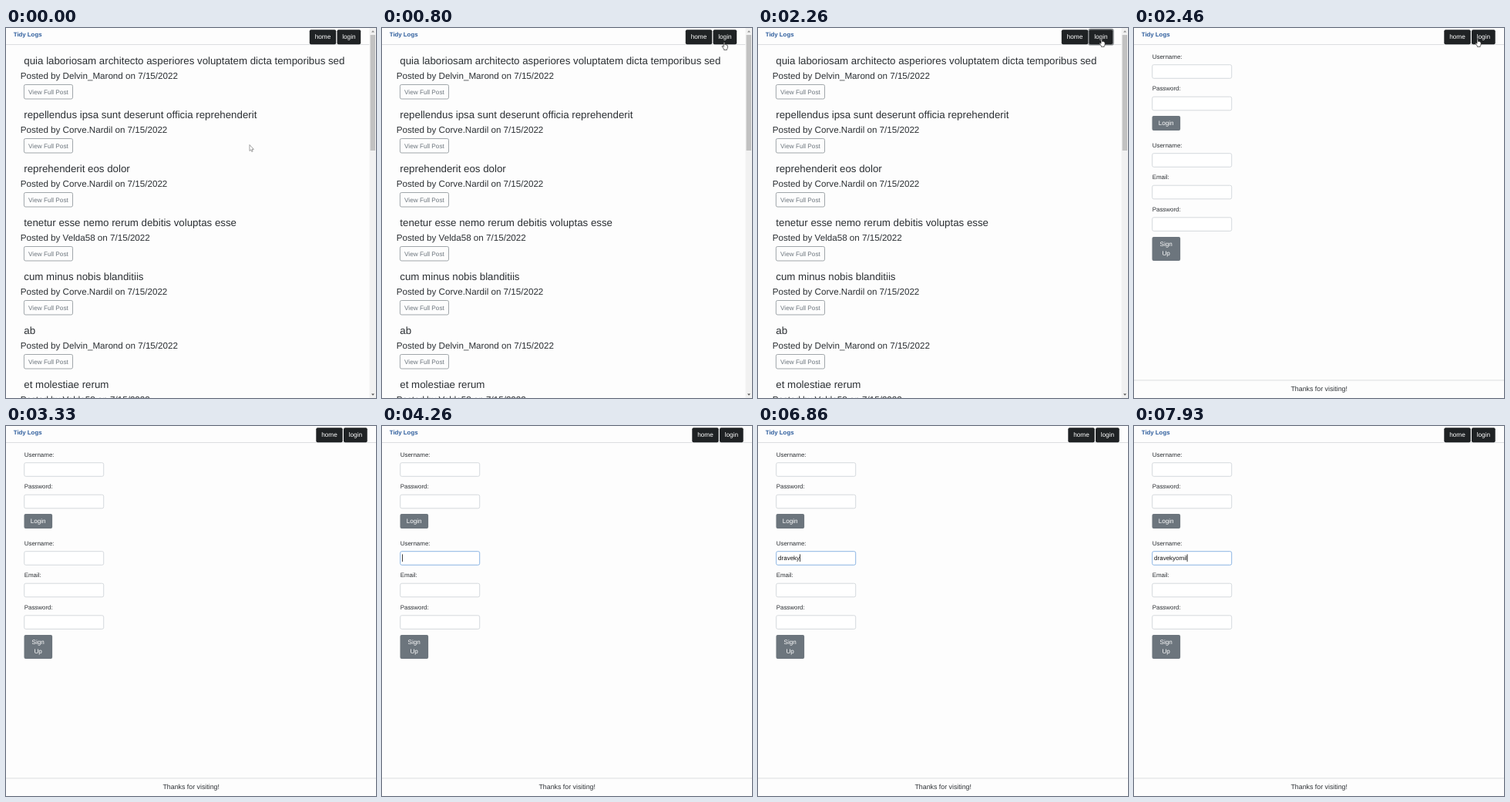
An HTML page that plays this animation: 480 by 480 pixels, repeating every 8000 ms.

```html
<!DOCTYPE html>
<html lang="en">
<head>
<meta charset="utf-8">
<title>Blog sign-up</title>
<style>
html, body { margin: 0; width: 100%; height: 100%; overflow: hidden; background: #fdfdfd; }
svg { display: block; width: 100vw; height: 100vh; }
text { font-family: "Liberation Sans", Arial, sans-serif; fill: #2c3034; text-rendering: geometricPrecision; white-space: pre; }
</style>
</head>
<body>
<svg id="stage" viewBox="0 0 480 480"></svg>
<script>
const LOOP = 8000;
const PAGE_SWITCH = 2400;
const FOCUS_AT = 3800;
const BLINK = 530;
const USER = "dravekyomil";
const KEY_TIMES = [4870, 5060, 5200, 5400, 5660, 5860, 6860, 7400, 7730, 7800, 7930];

const posts = [
  ["quia laboriosam architecto asperiores voluptatem dicta temporibus sed", "Delvin_Marond"],
  ["repellendus ipsa sunt deserunt officia reprehenderit", "Corve.Nardil"],
  ["reprehenderit eos dolor", "Corve.Nardil"],
  ["tenetur esse nemo rerum debitis voluptas esse", "Velda58"],
  ["cum minus nobis blanditiis", "Corve.Nardil"],
  ["ab", "Delvin_Marond"],
  ["et molestiae rerum", "Velda58"]
];

// Pointer stops: time, x, y of the tip
const stops = [
  [60, 316, 151.5], [860, 446, 16], [1400, 443.7, 17],
  [2200, 445.7, 14], [2600, 445.7, 14], [3380, 75, 171]
];

const stage = document.getElementById("stage");

function add(parent, tag, attrs, content) {
  const node = document.createElementNS("http://www.w3.org/2000/svg", tag);
  for (const key in attrs) node.setAttribute(key, attrs[key]);
  if (content !== undefined) node.textContent = content;
  parent.appendChild(node);
  return node;
}

const group = (parent = stage) => add(parent, "g", {});

const label = (parent, x, y, size, content, attrs = {}) =>
  add(parent, "text", { x, y, "font-size": size, ...attrs }, content);

const box = (parent, x, y, width, height, fill, attrs = {}) =>
  add(parent, "rect", { x, y, width, height, fill, ...attrs });

const centered = (parent, x, y, size, content, fill) =>
  label(parent, x, y, size, content, { "text-anchor": "middle", style: `fill:${fill}` });

function header(parent, shift, width) {
  box(parent, 0, 21, width, 1, "#dcdee0");
  label(parent, 9.8, 11.3, 7.8, "Tidy Logs", { "font-weight": 700, style: "fill:#2c5c9c" });
  const ring = box(parent, 429.1 + shift, 1.6, 31.8, 20.2, "none",
    { rx: 2.4, stroke: "#85898c", "stroke-width": 1.6, visibility: "hidden" });
  box(parent, 393.8 + shift, 2.2, 34.4, 19.1, "#1f2224", { rx: 2 });
  box(parent, 429.5 + shift, 2.2, 30.7, 19.1, "#1f2224", { rx: 2 });
  centered(parent, 411 + shift, 14.2, 8.25, "home", "#fff");
  centered(parent, 444.9 + shift, 14.2, 8.25, "login", "#fff");
  return ring;
}

function post(parent, [title, author], i) {
  const y = i * 70;
  label(parent, 23.3, y + 47.1, 13.31, title);
  label(parent, 18.7, y + 66.2, 11.64, `Posted by ${author} on 7/15/2022`);
  box(parent, 23.4, y + 73.5, 63.1, 18.5, "none", { rx: 1.9, stroke: "#8a9196", "stroke-width": 0.8 });
  centered(parent, 54.9, y + 85.6, 8.2, "View Full Post", "#6c757d");
}

function scrollbar(parent) {
  box(parent, 471.5, 0, 8.5, 480, "#f1f1f1");
  box(parent, 472.6, 9, 6.4, 150, "#c1c1c1");
  add(parent, "path", { d: "M474 5.6 L476 3.2 L478 5.6 Z", fill: "#8a8a8a" });
  add(parent, "path", { d: "M474 474.4 L476 476.8 L478 474.4 Z", fill: "#505050" });
}

function field(parent, name, y) {
  label(parent, 23.7, y, 7.95, name);
  return box(parent, 23.7, y + 7.8, 103, 17.6, "#fff",
    { rx: 2, stroke: "#cbd0d5", "stroke-width": 0.8 });
}

function submit(parent, y, height, lines) {
  box(parent, 23.5, y, 36.6, height, "#6c757d", { rx: 2 });
  lines.forEach((line, i) => centered(parent, 41.7, y + 12.2 + i * 12.2, 8.15, line, "#fff"));
}

const list = group();
const loginRing = header(list, 0, 471.5);
posts.forEach((item, i) => post(list, item, i));
scrollbar(list);

const form = group();
header(form, 8.5, 480);
field(form, "Username:", 39.9);
field(form, "Password:", 81.4);
submit(form, 114.1, 18.9, ["Login"]);
const nameField = field(form, "Username:", 154.9);
field(form, "Email:", 196.4);
field(form, "Password:", 238);
submit(form, 271, 31, ["Sign", "Up"]);
const typed = label(form, 26.1, 174, 8, "", { style: "fill:#111" });
const caret = box(form, 26, 166.4, 0.8, 9.6, "#111");
box(form, 0, 456.5, 480, 1, "#dcdee0");
centered(form, 240.2, 471.3, 8.82, "Thanks for visiting!", "#2c3034");

const outline = { fill: "#fff", "stroke-linejoin": "round", "stroke-width": 0.7 };
const arrow = add(stage, "path", {
  ...outline, stroke: "#777",
  d: "M0 0 V8 L1.7 6.4 L2.9 9 L4.1 8.4 L3 5.9 H5.4 Z"
});
const hand = add(stage, "path", {
  ...outline, stroke: "#222",
  d: "M-.7 .6 Q0 -.3 .7 .6 V3.4 Q1.6 2.9 2 3.8 Q2.9 3.3 3.3 4.2 Q4.4 3.9 4.4 5 V7 Q4.4 8.4 3.5 9.2 V10.3 H-.4 V9.2 L-2.7 6.2 Q-3 4.9 -1.8 5.3 L-.7 6.3 Z"
});

const show = (node, on) => node.setAttribute("visibility", on ? "visible" : "hidden");
const ease = p => p * p * (3 - 2 * p);

function pointerAt(t) {
  const next = stops.findIndex(stop => stop[0] > t);
  if (next === 0) return stops[0].slice(1);
  if (next < 0) return stops[stops.length - 1].slice(1);
  const [t0, x0, y0] = stops[next - 1];
  const [t1, x1, y1] = stops[next];
  const p = ease((t - t0) / (t1 - t0));
  return [x0 + (x1 - x0) * p, y0 + (y1 - y0) * p];
}

function drawPointer(t) {
  const [x, y] = pointerAt(t);
  const shift = t < PAGE_SWITCH ? 0 : 8.5;
  const overLogin = x > 429 + shift && x < 461 + shift && y < 21.5;
  const overField = t > PAGE_SWITCH && x < 127 && y > 162;
  for (const node of [arrow, hand]) node.setAttribute("transform", `translate(${x} ${y})`);
  show(arrow, !overLogin && !overField);
  show(hand, overLogin);
}

function drawInput(t) {
  const count = KEY_TIMES.filter(time => time <= t).length;
  const lastInput = count ? KEY_TIMES[count - 1] : FOCUS_AT;
  const focused = t >= FOCUS_AT;
  typed.textContent = USER.slice(0, count);
  const width = count ? typed.getComputedTextLength() : 0;
  caret.setAttribute("x", 26 + width);
  show(caret, focused && Math.floor((t - lastInput) / BLINK) % 2 === 0);
  nameField.setAttribute("stroke", focused ? "#6fa3dc" : "#cbd0d5");
}

function render(t) {
  const onList = t < PAGE_SWITCH;
  list.style.display = onList ? "" : "none";
  form.style.display = onList ? "none" : "";
  show(loginRing, onList && t >= 2200);
  if (!onList) drawInput(t);
  drawPointer(t);
}

const start = performance.now();
function tick() {
  render((performance.now() - start) % LOOP);
  requestAnimationFrame(tick);
}
tick();
</script>
</body>
</html>
```
